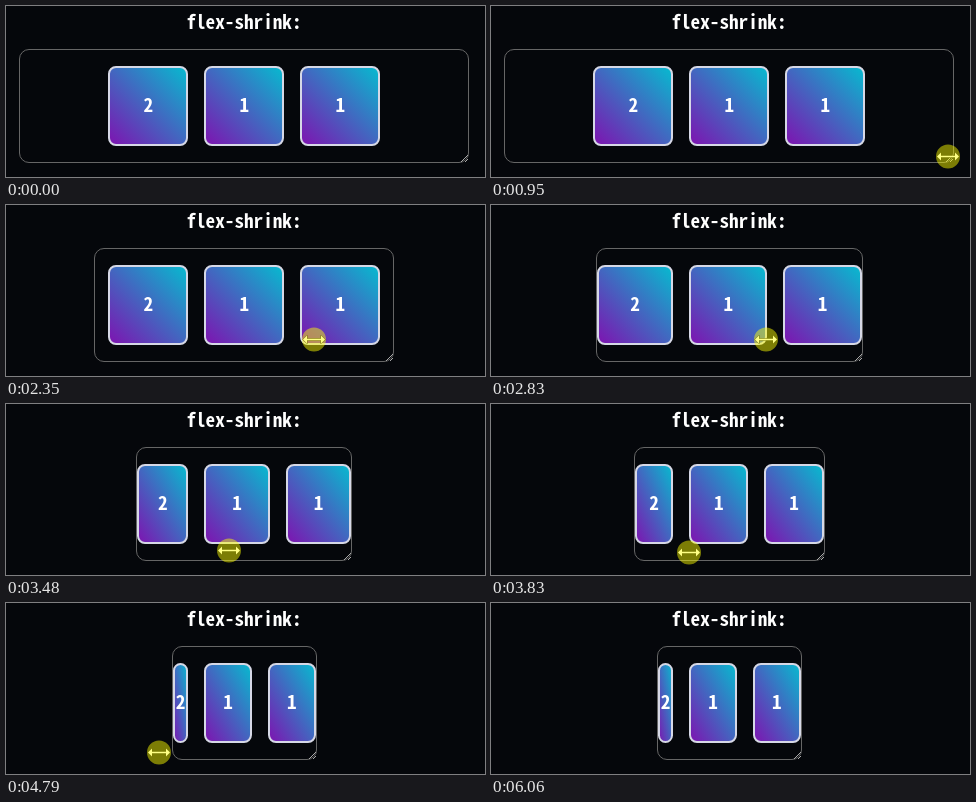
These frames come from a looping animation (479 by 171 pixels, 7200 ms). An HTML page:

```html
<!DOCTYPE html>
<html lang="en">
<head>
<meta charset="utf-8">
<title>flex-shrink</title>
<style>
  * { box-sizing: border-box; }
  html, body { margin: 0; width: 100%; height: 100%; overflow: hidden; background: #05070b; }
  body { position: relative; color: #fff; font: bold 16px/20px "Noto Sans Mono", monospace; }
  @supports (font-size-adjust: ch-width 0.6) {
    body { font-family: "Noto Sans Mono CJK JP", "Noto Sans Mono", monospace; font-size-adjust: ch-width 0.6; }
  }
  h1, .item { display: flex; justify-content: center; align-items: baseline; }
  /* Empty strut: its bottom edge fixes the text baseline. */
  h1::before, .item::before { content: ""; height: var(--baseline); }
  h1 { --baseline: 23px; position: absolute; left: 0; top: 0; width: 476px; margin: 0; font: inherit; font-size-adjust: inherit; }
  #row {
    position: absolute; top: 43px; height: 114px;
    display: flex; justify-content: center; align-items: center; gap: 16px;
    border: 1px solid #666; border-radius: 10px;
  }
  .item {
    --baseline: 44px;
    flex: 0 1 80px; min-width: 0; height: 80px;
    border: 2px solid #d6d8e6; border-radius: 8px;
    background: linear-gradient(to top right, #8010b0, #05bdd0) border-box;
  }
  .item:first-child { flex-shrink: 2; }
  #grip { position: absolute; right: 0; bottom: 0; }
  #overlay { position: absolute; left: 0; top: 0; }
</style>
</head>
<body>
<h1>flex-shrink:</h1>
<div id="row">
  <div class="item">2</div>
  <div class="item">1</div>
  <div class="item">1</div>
  <svg id="grip" width="7" height="7" fill="none" stroke="#aaa"><path d="M0 7 7 0M4 7 7 4"/></svg>
</div>
<svg id="overlay" width="479" height="171">
  <g id="cursor">
    <path id="pointer" d="M0 0V16L3.7 12.6 6.2 18.3 8.6 17.2 6.2 11.7H11.3Z" fill="#fff" stroke="#000"/>
    <path id="resize" d="M-11 0-7-4V-.7H7V-4L11 0 7 4V.7H-7V4Z" fill="#fff" stroke="#000" paint-order="stroke"/>
    <circle id="press" r="12" fill="#ff0" fill-opacity=".48"/>
  </g>
</svg>
<script>
const LOOP = 7200, CENTER = 238.2;
const ENTER = 200, PRESS = 950, RELEASE = 5580, LEAVE = 6060;

// Key poses: time, row width, cursor x, cursor y.
const poses = [
  [ENTER, 450, 457, 171],
  [680, 450, 457, 150],
  [PRESS, 450, 457, 150],
  [1500, 389, 392, 141],
  [2350, 300, 308, 134],
  [2830, 267, 275, 134],
  [3480, 216, 223, 146],
  [4170, 166, 173, 149],
  [4660, 145, 153, 149],
  [RELEASE, 145, 153, 149],
  [LEAVE, 145, 188, 172],
];

function poseAt(time) {
  const t = Math.min(Math.max(time, ENTER), LEAVE);
  const next = poses.findIndex((pose, i) => i > 0 && pose[0] >= t);
  const a = poses[next - 1], b = poses[next];
  const part = (t - a[0]) / (b[0] - a[0]);
  return a.map((value, i) => Math.round(value + (b[i] - value) * part));
}

const el = id => document.getElementById(id);
const show = (id, on) => el(id).style.display = on ? '' : 'none';

function draw() {
  const t = performance.now() % LOOP;
  const [, width, x, y] = poseAt(t);
  el('row').style.width = width + 'px';
  el('row').style.left = CENTER - width / 2 + 'px';

  const resizing = t < RELEASE && y < 156;
  el('cursor').setAttribute('transform', `translate(${x} ${y + 0.5})`);
  show('cursor', t >= ENTER && t < LEAVE);
  show('resize', resizing);
  show('pointer', !resizing);
  show('press', t >= PRESS && t < RELEASE);
  requestAnimationFrame(draw);
}
draw();
</script>
</body>
</html>
```
